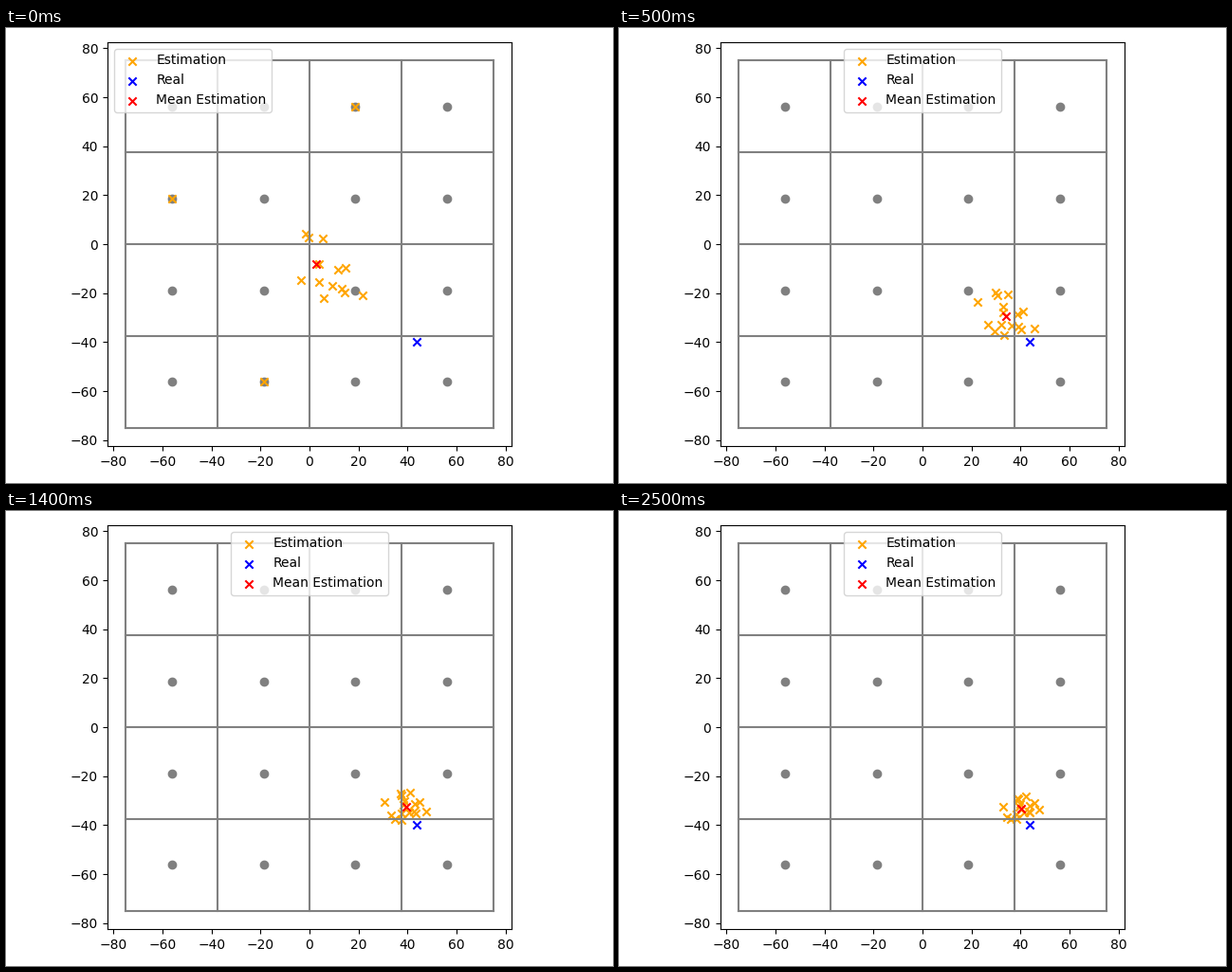
Recreate the animation shown at these times as a matplotlib script. Size 640 by 480 pixels, loop 2600 ms.

```python
import matplotlib.pyplot as plt
import numpy as np
from matplotlib.animation import FuncAnimation

FRAMES, INTERVAL = 26, 100
REAL = (43.7, -40)

# The cloud drifts from START to REST while its shape relaxes to CLOUD.
START, REST = np.array([5, -10]), np.array([40.3, -33.3])
CLOUD = np.array([
    (-7, 0.4), (-3.9, -4.3), (0, 1.6), (-5.4, -3.5),
    (-1.6, -2.3), (-0.8, 3.5), (2.3, 4.7), (-1.2, 3.9),
    (3.1, -1.2), (3.5, 1.2), (1.2, -1.6), (3.5, -1.6),
    (-0.4, 0.4), (-1.6, -4.3), (5.4, 2.3), (7.4, -0.4),
])
STRETCH = np.array([[1.2, -1], [-1.3, 2.3]])

# The first estimators still sit on their own cell centres at the outset.
WAITING = [(-56.25, 18.75), (-18.75, -56.25), (18.75, 56.25)]


def estimates(frame):
    remaining = 0.78 * 0.62 ** frame + 0.22 * 0.88 ** frame
    shape = np.eye(2) + 0.87 ** frame * STRETCH
    points = REST + remaining * (START - REST) + CLOUD @ shape.T
    if frame == 0:
        points[:len(WAITING)] = WAITING
    return points


def crosses(points, color, label):
    return ax.scatter(*np.transpose(points), marker="x", color=color, label=label)


fig, ax = plt.subplots(figsize=(6.4, 4.8), dpi=100)
ax.set_aspect("equal")

for edge in np.linspace(-75, 75, 5):
    ax.plot([-75, 75], [edge, edge], color="gray")
    ax.plot([edge, edge], [-75, 75], color="gray")

centres = np.linspace(-56.25, 56.25, 4)
ax.scatter(*np.meshgrid(centres, centres), color="gray")

cloud = crosses(estimates(0), "orange", "Estimation")
crosses([REAL], "blue", "Real")
mean = crosses([START], "red", "Mean Estimation")
legend = ax.legend(loc="upper left")

ax.set(xlim=(-82.5, 82.5), ylim=(-82.5, 82.5))
ticks = range(-80, 81, 20)
ax.set_xticks(ticks)
ax.set_yticks(ticks)
fig.tight_layout()


def update(frame):
    points = estimates(frame)
    cloud.set_offsets(points)
    mean.set_offsets([points.mean(axis=0)])
    legend.set_loc("upper center" if frame else "upper left")
    return cloud, mean, legend


animation = FuncAnimation(fig, update, frames=FRAMES, interval=INTERVAL,
                          repeat=True, repeat_delay=0)
plt.show()
```
